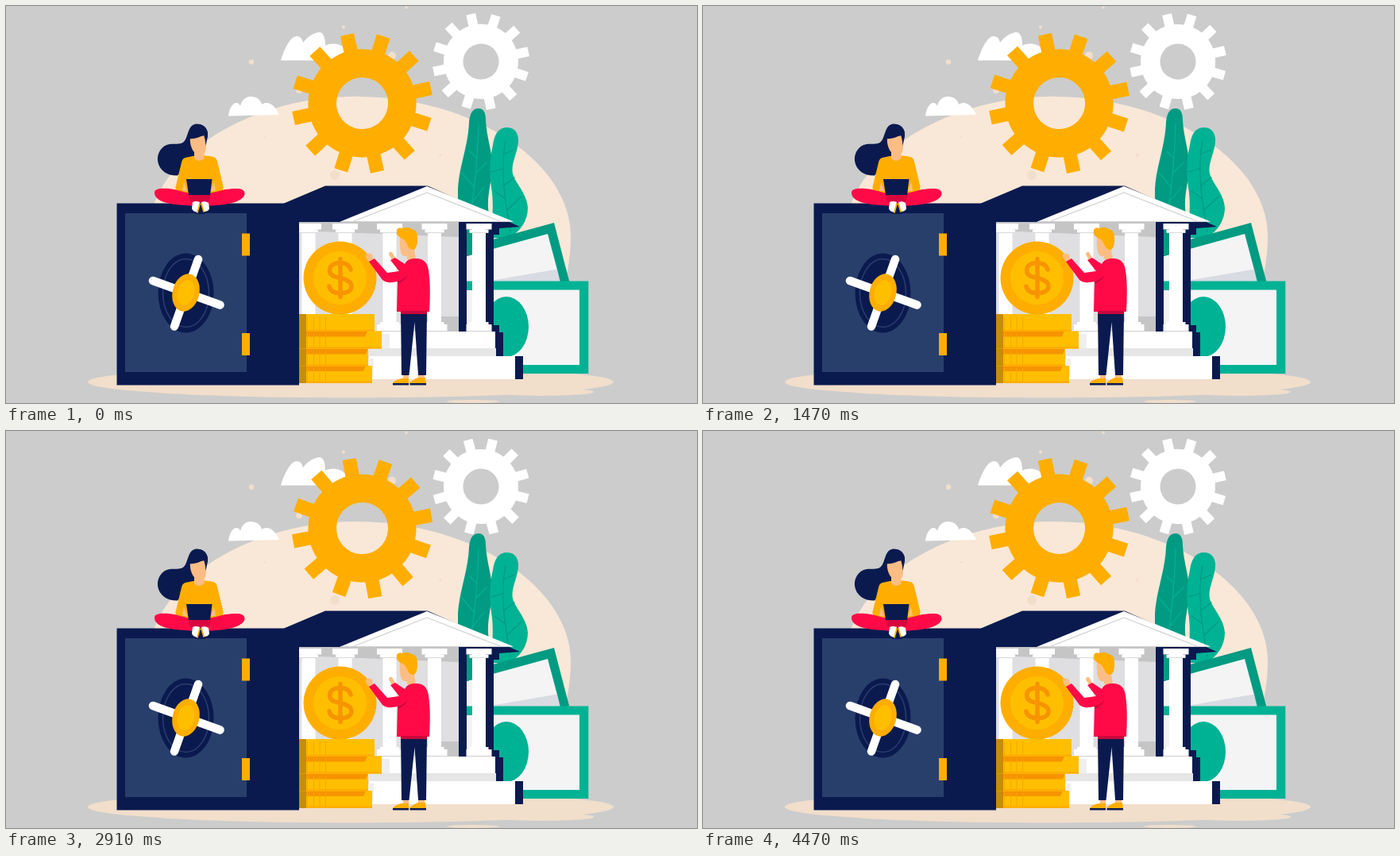
An HTML page for the animation above (4.5 s loop, 870 by 500 pixels).

```html
<!DOCTYPE html>
<html lang="en">
<head>
<meta charset="utf-8">
<title>Bank and savings</title>
<style>
  html, body { margin: 0; width: 100%; height: 100%; overflow: hidden; background: #ccc; }
  svg { display: block; width: 100vw; height: 100vh; }
  .navy { fill: #0a1a4f; }
  .gold { fill: #ffae00; }
  .sun { fill: #ffbf00; }
  .amber { fill: #f79400; }
  .red { fill: #ff0a47; }
  .skin { fill: #fbbd83; }
  .white { fill: #fff; }
  .paper { fill: #f4f4f5; }
  .sand { fill: #f1decb; }
  .leaf { fill: #00b294; }
  .pine { fill: #009b82; }
  .line { fill: none; stroke-linecap: round; stroke-linejoin: round; }
</style>
</head>
<body>
<svg viewBox="0 0 870 500" xmlns="http://www.w3.org/2000/svg">
  <rect width="870" height="500" fill="#ccc"/>

  <!-- backdrop -->
  <path fill="#f9e8d7" d="M179 290C179 192 305 114 440 114C590 114 711 198 711 290C711 312 708 330 703 352L640 400H179Z"/>
  <g class="sand">
    <ellipse cx="434" cy="473.5" rx="331" ry="20"/>
    <ellipse cx="675" cy="486" rx="65" ry="5"/>
    <ellipse cx="588" cy="498" rx="33" ry="2"/>
    <circle cx="309" cy="70.500" r="3.200"/>
    <circle cx="504" cy="2" r="1.800"/>
    <circle cx="369" cy="106.500" r="3.800"/>
    <circle cx="486" cy="62.500" r="5"/>
    <circle cx="425" cy="26.500" r="2"/>
    <circle cx="325.500" cy="165" r="1.500"/>
    <circle cx="547" cy="188" r="1.800"/>
    <circle cx="414" cy="213" r="6"/>
  </g>
  <g class="white">
    <path d="M346 68.500C350 55 358 38 366 38C371 38 373 42 374 46C380 38 389 33 395 33C401 34 402 43 402 50C408 47 414 47 420 49C426 51 430 57 432 62L424 68.500Z"/>
    <path d="M280 138.500C281 130 285 122 290 122C293 122 294 124 295 126C297 118 302 114 308 114C315 114 321 118 322 124C330 119 338 124 344 137Z"/>
  </g>

  <!-- plants -->
  <path class="pine" d="M595 129C587 129 584 136 583 146C582 178 569 205 569 235V310H598C607 295 610 272 608 262C604 242 612 222 612 200C612 182 605 165 604 144C604 134 601 129 595 129Z"/>
  <path class="leaf" d="M631 153C620 153 615 161 613 175C608 197 609 215 611 228C614 246 613 268 610 292H633C648 284 657 270 657 254C656 236 641 223 638 211C635 198 646 182 645 167C644 158 639 153 631 153Z"/>
  <g class="line" stroke="#00b294" stroke-width="1.200">
    <path d="M595 148C594 195 590 230 584 270M593 192L584 183M592 210L605 197M590 229L574 210M588 246L602 228"/>
  </g>
  <g class="line" stroke="#009b82" stroke-width="1.300">
    <path d="M629 170C622 205 628 245 635 284M626 187L640 181M625 205L611 209M627 226L640 216M629 243L615 233M631 257L649 240"/>
  </g>

  <!-- banknotes -->
  <path class="pine" d="M580 303L690 273L710 350H580Z"/>
  <path class="paper" d="M580 315L682 287L698 347H580Z"/>
  <path fill="#d9dbe2" d="M604 347L694 331.500L698 347Z"/>
  <path class="pine" d="M694 331.500L704.500 330L710 350H698Z" opacity=".6"/>
  <rect class="leaf" x="580" y="346.500" width="153.300" height="116.500"/>
  <rect class="paper" x="580" y="357.500" width="142" height="94.500"/>
  <ellipse class="leaf" cx="630" cy="404" rx="28" ry="38"/>

  <!-- bank -->
  <rect x="369" y="271" width="201" height="199" fill="#dfdee0"/>
  <path fill="#c5c5c6" d="M369 271H570V291L369 283ZM530 391H570V410H530Z"/>
  <path class="navy" d="M350 248.500L402 226.500H531L647 278L621 280V288H614V402H621V411H626V441H651V470H600V411H570V272H421H369L350 262Z"/>
  <path class="paper" d="M580 315L587 313V347H580ZM580 357.500H587V402H580Z"/>
  <path class="pine" d="M580 282H587V313L580 315Z"/>
  <rect class="leaf" x="580" y="346.500" width="7" height="11"/>
  <path class="white" d="M530 227L421 271.500H639Z"/>
  <path class="line" stroke="#d2d2d3" stroke-width="1.300" d="M438 271L530 235L622 271"/>
  <path stroke="#d2d2d3" d="M421 271.500H638"/>
  <g id="columns"></g>
  <g class="white">
    <rect x="443" y="410" width="173" height="21"/>
    <rect x="457" y="441" width="184" height="29"/>
  </g>
  <rect x="455" y="431" width="162" height="10" fill="#e6e6e7"/>
  <path fill="#efeff0" d="M473 413H483V431H473ZM456 444H463V467H456Z"/>

  <!-- safe -->
  <rect class="navy" x="139.500" y="248.500" width="229.500" height="229"/>
  <rect x="150" y="261" width="153" height="200" fill="#293f6b"/>
  <path class="gold" d="M297 286.500H307V314.500H297ZM297 412H307V440H297Z"/>
  <ellipse class="navy" cx="226.500" cy="361.500" rx="35" ry="50"/>
  <ellipse class="line" cx="226.500" cy="361.500" rx="29" ry="43" stroke="#293f6b" stroke-width="1.500"/>
  <path class="line" stroke="#fff" stroke-width="10.500" d="M185 346L269.500 376.500M242 319L212 403.500"/>
  <g transform="rotate(14 226.500 361)">
    <ellipse class="gold" cx="226.500" cy="361" rx="16.800" ry="24"/>
    <ellipse class="sun" cx="226.500" cy="361" rx="10.500" ry="16"/>
  </g>

  <!-- woman -->
  <path class="navy" d="M254 164C255 152 246 148 239 148.500C230 150 230 160 226 168C222 176 213 173 206 174C195 176 190 186 191 195C193 208 204 214 216 213.500L228 200L246 182Z"/>
  <path class="gold" d="M226 191Q243 186 261 190Q265 191 266 196L273.500 227Q274 234 268 236H220Q213 235 213.500 228L221 197Q222 192 226 191Z"/>
  <path class="skin" d="M232 166L251 163C253 174 252 184 249.500 186V192Q243 198 237 192V184C234 181 231 173 232 166Z"/>
  <path class="navy" d="M230 167C229 156 234 150 240 149C250 148 255 156 254 164L251.500 176Q251 168 249 162Q241 168 230 167Z"/>
  <path class="skin" d="M224 221L228 233H222ZM262 221L258 233H264Z"/>
  <path class="red" d="M187 236C186 229 198 229 212 231Q228 236 244 238Q262 235 276 231C292 229 301 229 300.500 237C299 245 283 250 264 251Q244 253 226 251C205 250 188 246 187 236Z"/>
  <path fill="#d9053f" d="M230 238H258L256 246Q244 249 232 247Z"/>
  <path class="navy" d="M227 218H259.500L257 238H230Z"/>
  <path class="navy" d="M244.500 247L251 262H238Z"/>
  <path class="white" d="M235 247Q239 245 244 247L241 260Q235 259 234 255ZM246 247Q251 245 255 248L256 255Q255 259 249 259Z"/>
  <path class="line" stroke="#ffae00" stroke-width="1.800" d="M244 249L241 260M246 249L249 259"/>

  <!-- coins -->
  <g id="stack"></g>
  <circle class="gold" cx="420.500" cy="342.500" r="46"/>
  <circle class="sun" cx="420.500" cy="342.500" r="33.500"/>
  <path class="line" stroke="#f79400" stroke-width="5.500" d="M421 318.500V366.500M434 332C432 325 427 323.500 421 323.500C413 323.500 407.500 327 407.500 333C407.500 340 414 341 421 342.500C429 344.500 435 347 435 353C435 359 429 361.500 421 361.500C413 361.500 408 359 407 353"/>

  <!-- man -->
  <path class="skin" d="M463 322L461 313Q456 310 453 313Q452 317 457 322ZM486 320L482 313Q482 309 486 310L491 319Z"/>
  <path class="skin" d="M496 291L511 293L516 318Q509 323 505 318V315Q499 316 497.500 311Q495 303 496 291Z"/>
  <path class="gold" d="M492 282Q494 278 499 280Q506 277 511 281Q518 282 518 291Q519 302 514 307Q508 308 505 300Q503 294 497 292Q491 289 492 282Z"/>
  <path class="navy" d="M497 384H530L529 465H519L514.500 398L507.500 465H498Z"/>
  <path class="red" d="M457 322L464 318L480 336L495 334L484 320L490 317L502 325Q506 317 518 318Q530 319 532 333Q535 352 533 385H492L493 347Q479 350 474 345Z"/>
  <path fill="#c9073d" d="M493 347Q501 345 506 338Q503 346 493 350ZM497 384H530V388H497Z"/>
  <path class="skin" d="M500 465H507V470H500ZM519 465H527V470H519Z"/>
  <path class="gold" d="M498 469H507V475H487Q489 471 498 469ZM519 468H528L529 475H508Q511 471 519 468Z"/>
  <path class="navy" d="M487 475H507V477.500H487ZM508.500 475H529V477.500H508.500Z"/>

  <!-- gears -->
  <g id="gears"></g>
</svg>
<script>
const LOOP = 4500, STEP = 30, TEETH = 12;
const byId = id => document.getElementById(id);

function add(parent, tag, attrs) {
  const el = document.createElementNS("http://www.w3.org/2000/svg", tag);
  for (const key in attrs) el.setAttribute(key, attrs[key]);
  return parent.appendChild(el);
}

function box(parent, x, y, width, height, fill) {
  return add(parent, "rect", { x, y, width, height, fill });
}

for (const x of [381, 427, 483, 539.5, 595.5]) {
  const g = byId("columns");
  box(g, x - 8.5, 274, 17, 132, "#fff");
  box(g, x - 16, 274, 32, 7.5, "#fff");
  box(g, x - 12, 281.5, 24, 3.5, "#fff");
  box(g, x - 12, 285, 24, 1, "#d8d8d9");
  box(g, x - 12, 398, 24, 4, "#fff");
  box(g, x - 16, 401, 32, 8.5, "#fff");
  box(g, x - 16, 409, 32, 1, "#cfcfd0");
}

// each coin: top edge, right edge, end of the shadow cast on it
[[453, 461, 453], [431.5, 456, 456], [409.5, 473, 455], [388, 464, 0]].forEach(([y, right, shade]) => {
  const g = byId("stack");
  box(g, 369, y, right - 369, 22, "#ffbf00");
  box(g, 369, y + 19.5, right - 369, 2.5, "#ffae00");
  if (shade) add(g, "path", { class: "amber", d: `M369 ${y}H${shade}L${shade - 3} ${y + 7}H369Z` });
  for (const x of [379, 387, 394.5, 402]) box(g, x, y + 3, 1, 17, "#f7a600");
  box(g, 369, y, 9, 22, "#c68d08");
});

function gear(cx, cy, hole, body, tip, width, color, phase, turn) {
  const g = add(byId("gears"), "g", { stroke: color, fill: "none" });
  add(g, "circle", { r: (hole + body) / 2, "stroke-width": body - hole });
  for (let i = 0; i < TEETH; i++) {
    add(g, "path", {
      d: `M0 ${4 - body}V${-tip}`,
      "stroke-width": width,
      transform: `rotate(${i * 360 / TEETH})`
    });
  }
  return p => g.setAttribute("transform", `translate(${cx} ${cy}) rotate(${phase + turn * p})`);
}

const gears = [
  gear(448.5, 122.5, 32.5, 68, 88.5, 17.5, "#ffae00", 17.6, -90),
  gear(598, 70, 22.5, 47, 61, 12, "#fff", 18, 180)
];

function draw(ms) {
  const t = Math.floor(ms % LOOP / STEP) * STEP;
  gears.forEach(spin => spin(t / LOOP));
}

let start;
function tick(now) {
  start ??= now;
  draw(now - start);
  requestAnimationFrame(tick);
}
draw(0);
requestAnimationFrame(tick);
</script>
</body>
</html>
```
